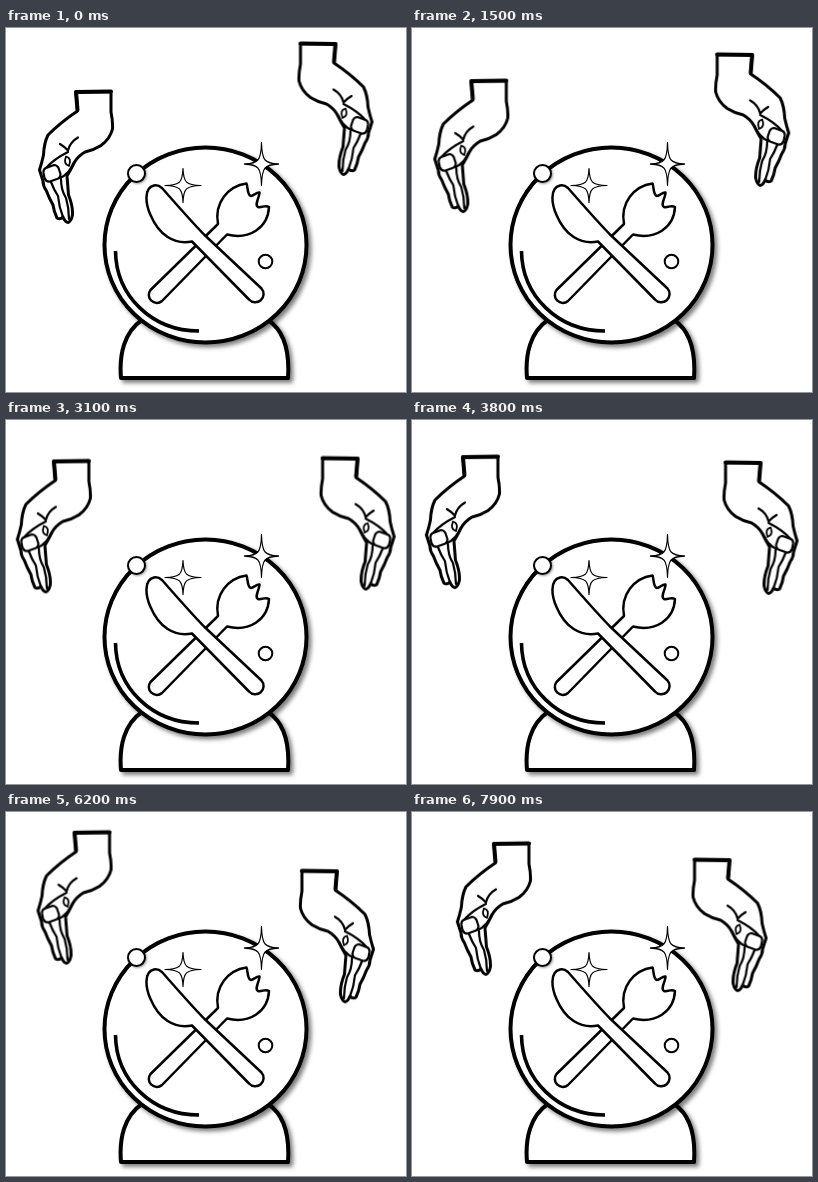
These frames come from a looping animation (400x364 px, 8000 ms). An HTML page:

```html
<!DOCTYPE html>
<html lang="en">
<head>
<meta charset="utf-8">
<title>Crystal ball</title>
<style>
  html, body { margin: 0; width: 100%; height: 100%; overflow: hidden; background: #fff; }
  svg { display: block; width: 400px; height: 364px; }
  .ink { fill: #fff; stroke: #000; stroke-linejoin: round; stroke-linecap: round; }
  .line { fill: none; }
  .shadow { filter: drop-shadow(3px 3px 2px rgba(0, 0, 0, .5)); }
  .soft { filter: drop-shadow(1px 1px 1px rgba(0, 0, 0, .4)); }

  /* --d flips the vertical direction for the mirrored hand */
  .drift { animation: drift 8s infinite; }
  .left { --d: 1; }
  .right { --d: -1; }
  @keyframes drift {
    0%      { transform: translate(0, 0); animation-timing-function: steps(32); }
    40%     { transform: translate(-22.9px, calc(var(--d) * -23.3px)); animation-timing-function: step-end; }
    41.25%  { transform: translate(-22.9px, calc(var(--d) * -23.3px)); animation-timing-function: steps(20); }
    66.25%  { transform: translate(-7.7px, calc(var(--d) * -37.7px)); animation-timing-function: step-end; }
    67.5%   { transform: translate(-7.7px, calc(var(--d) * -37.7px)); animation-timing-function: steps(9); }
    78.75%  { transform: translate(-.7px, calc(var(--d) * -44px)); animation-timing-function: steps(17); }
    100%    { transform: translate(12.7px, calc(var(--d) * -31.4px)); }
  }
</style>
</head>
<body>
<svg viewBox="0 0 400 364">
  <defs>
    <g id="hand" class="ink" stroke-width="2.2">
      <path stroke-width="3" d="M70 64 L105 63.500 L105 84 Q107 94 106.500 101 Q104 111 95 117.500 Q88 122 79 124 Q72 128 68 135
        Q64 143 61 148 Q62 160 62.500 167 Q67 178 66.500 187 Q65 194 62 194.500 Q59 194 57 189 Q54 192 51 190
        Q48 184 47 177 Q43 170 40.500 163 Q37 158 37 153 L33.500 142 Q36 134 37.500 127 Q38 115 42 107 Q55 94 71.500 83 Z"/>
      <path stroke-width="4" class="line" d="M70 64 L105 63.500 M70 64 L71.500 82"/>
      <path class="line" d="M45 154 Q48 162 52 168 Q53 179 57 189 M55 151 Q55 162 60 170 Q63 180 63 191"/>
      <path class="line" d="M40 140 Q48 131 62 124 M54 150 Q63 146 68 135"/>
      <path class="line" d="M54 116 Q59 119 62 122.500 Q64 114 72 109.500"/>
      <path stroke-width="1.800" d="M60 128.500 Q66 130 63 138 Q57 136 60 128.500 Z"/>
      <path d="M40 140 L48 137 Q51 137 52.500 140 L54.500 146 Q54.500 150 51 151 L44 153.500 Q40 154 38.500 150 L37.500 145 Q37 141 40 140 Z"/>
    </g>
    <path id="star" d="M0 -17 C.5 -3 3 -.5 18 0 C3 .5 .5 3 0 17 C-.5 3 -3 .5 -18 0 C-3 -.5 -.5 -3 0 -17 Z"/>
  </defs>

  <path class="ink shadow" stroke-width="4"
    d="M136 292 C118 304 113 327 115 350 L282 350 C283.500 327 280 304 262 292 Z"/>
  <ellipse class="ink shadow" cx="199.500" cy="217" rx="101" ry="97.500" stroke-width="4"/>
  <path class="ink line" stroke-width="3.600" style="stroke-linecap:butt" d="M109.500 223 C110 268 146 303 193 303"/>
  <circle class="ink soft" cx="130.500" cy="145.500" r="8.500" stroke-width="2"/>
  <circle class="ink" cx="259.500" cy="233.500" r="6.800" stroke-width="2"/>

  <g class="ink" stroke-width="2.500">
    <path d="M144.500 262 L212 196 C208 175 222 158 240.500 155.500 C242 159 241 167 245 168 C248 168 250 164 253.500 164.500
      C254 168 248 177 252 179 C256 180 259 176.500 263 179 C262 200 243 212 221 206.500 L156 273 A8 8 0 0 1 144.500 262 Z"/>
    <path d="M148 157.500 C137 160 140 177 144.500 187 C153 207 168 217 186 213.500 L243 271.500 A8 8 0 0 0 255.500 260.500 L198 206.500
      Q184 192 156 160 Q152 156.500 148 157.500 Z"/>
  </g>

  <g class="ink" stroke-width="1.200">
    <use href="#star" transform="translate(177 157.500)"/>
    <use href="#star" transform="translate(255.500 136) scale(.95 1.25)"/>
  </g>

  <g class="drift left"><use href="#hand"/></g>
  <g transform="translate(399.500 -48) scale(-1 1)">
    <g class="drift right"><use href="#hand"/></g>
  </g>
</svg>
</body>
</html>
```
